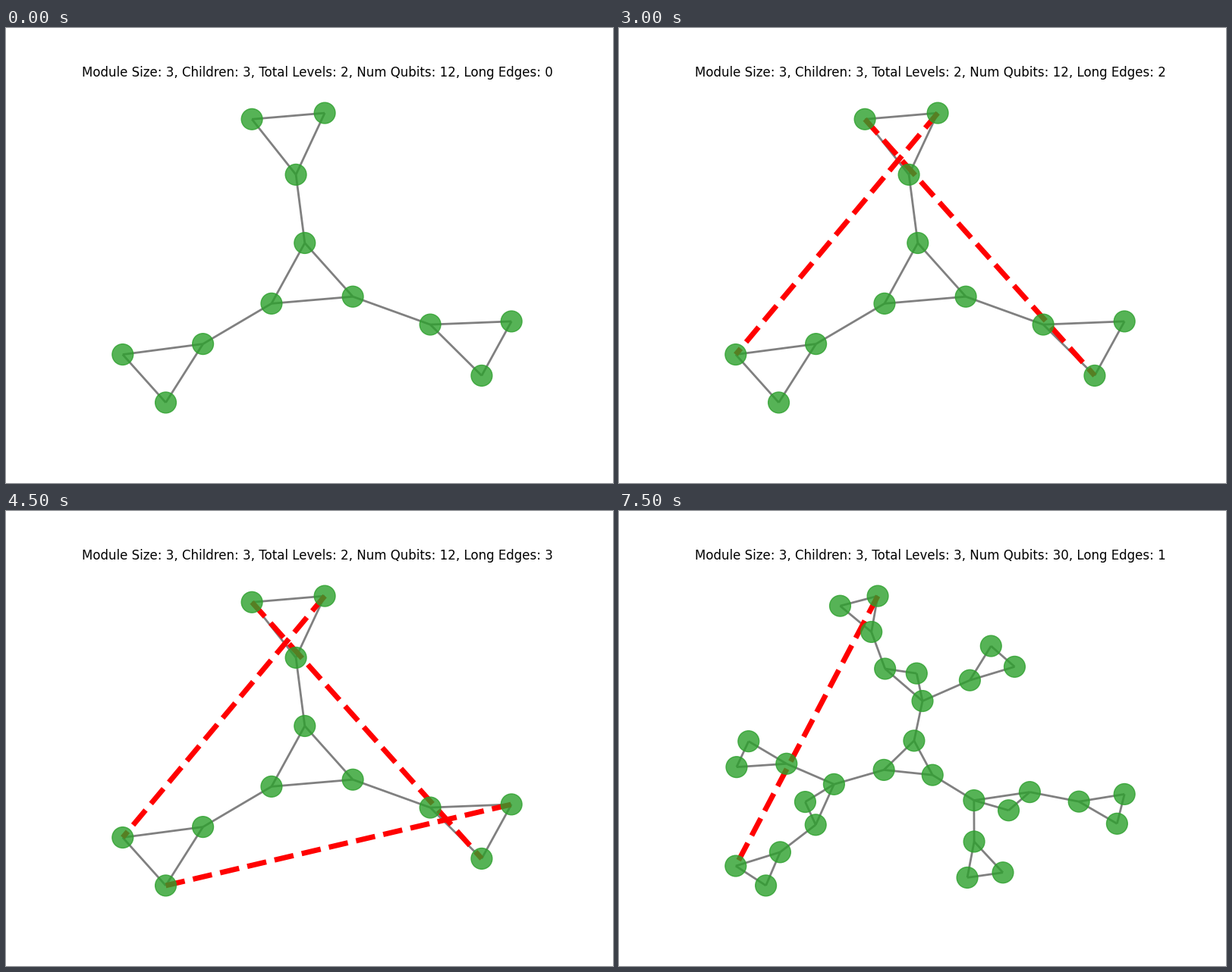
A matplotlib script that plays this animation: 800x600 px, repeating every 8000 ms.

```python
import numpy as np
import matplotlib.pyplot as plt
from matplotlib.animation import FuncAnimation
from matplotlib.collections import LineCollection

STEP_MS = 500
HOLD = 3  # ticks per state
TICKS = 16
ARMS = 3
MARGIN = 0.105

# One arm of each tree as (radius, degrees): a hub node, then triangles.
SMALL_ARM = [(62.2, 96), (173.85, 96), (273.8, 106.15), (273.8, 85.85)]
LARGE_ARM = [
    (37.36, 82.08),
    (107.68, 81.32), (166.15, 101.48), (154.95, 86.84),
    (232.9, 102.66), (287.9, 108.69), (293.15, 98.37),
    (162.93, 61.15), (228.85, 62.27), (215.9, 50.40),
]


def layout(arm):
    """Turn the arm around the centre and stretch the result to a unit box."""
    r, deg = np.array(arm).T
    turns = np.arange(ARMS)[:, None] * 360 / ARMS
    a = np.radians(deg + turns).ravel()
    r = np.tile(r, ARMS)
    xy = np.column_stack([r * np.cos(a), r * np.sin(a)])
    low, high = xy.min(axis=0), xy.max(axis=0)
    return (xy - low) / (high - low)


def tree_edges(size, parents):
    """Join the hubs in a ring; hang each triangle on its parent node."""
    edges = []
    for arm in range(ARMS):
        base = arm * size
        edges.append((base, (arm + 1) % ARMS * size))
        for i, parent in enumerate(parents):
            a = base + 1 + 3 * i
            edges += [(base + parent, a),
                      (a, a + 1), (a + 1, a + 2), (a, a + 2)]
    return edges


def make_graph(levels, arm, parents, long_edges):
    xy = layout(arm)
    edges = tree_edges(len(arm), parents)
    return levels, xy, xy[edges], xy[long_edges]


GRAPHS = [
    make_graph(2, SMALL_ARM, [0], [(3, 7), (2, 11), (6, 10)]),
    make_graph(3, LARGE_ARM, [0, 2, 1], [(6, 16)]),
]
STATES = [(g, n) for g in GRAPHS for n in range(len(g[3]) + 1)]

fig, ax = plt.subplots(figsize=(8, 6), dpi=100)
ax.set_axis_off()
ax.set_xlim(-MARGIN, 1 + MARGIN)
ax.set_ylim(-MARGIN, 1 + MARGIN)

links = ax.add_collection(
    LineCollection([], colors="gray", linewidths=2, zorder=1), autolim=False)
long_links = ax.add_collection(
    LineCollection([], colors="red", linewidths=5, linestyles="dashed",
                   zorder=1.5), autolim=False)
dots = ax.scatter([], [], s=400, alpha=0.8, zorder=2)
title = ax.set_title("", fontsize=12)


def draw(tick):
    (levels, xy, edges, long_edges), shown = STATES[tick // HOLD]
    links.set_segments(edges)
    long_links.set_segments(long_edges[:shown])
    dots.set_offsets(xy)
    # a colour per node keeps the discs from snapping to whole pixels
    dots.set_facecolor(["tab:green"] * len(xy))
    title.set_text(
        f"Module Size: 3, Children: 3, Total Levels: {levels}, "
        f"Num Qubits: {len(xy)}, Long Edges: {shown}")
    return links, long_links, dots, title


def reset():
    return draw(0)


anim = FuncAnimation(fig, draw, frames=TICKS, init_func=reset,
                     interval=STEP_MS, repeat=True, repeat_delay=0)
plt.show()
```
